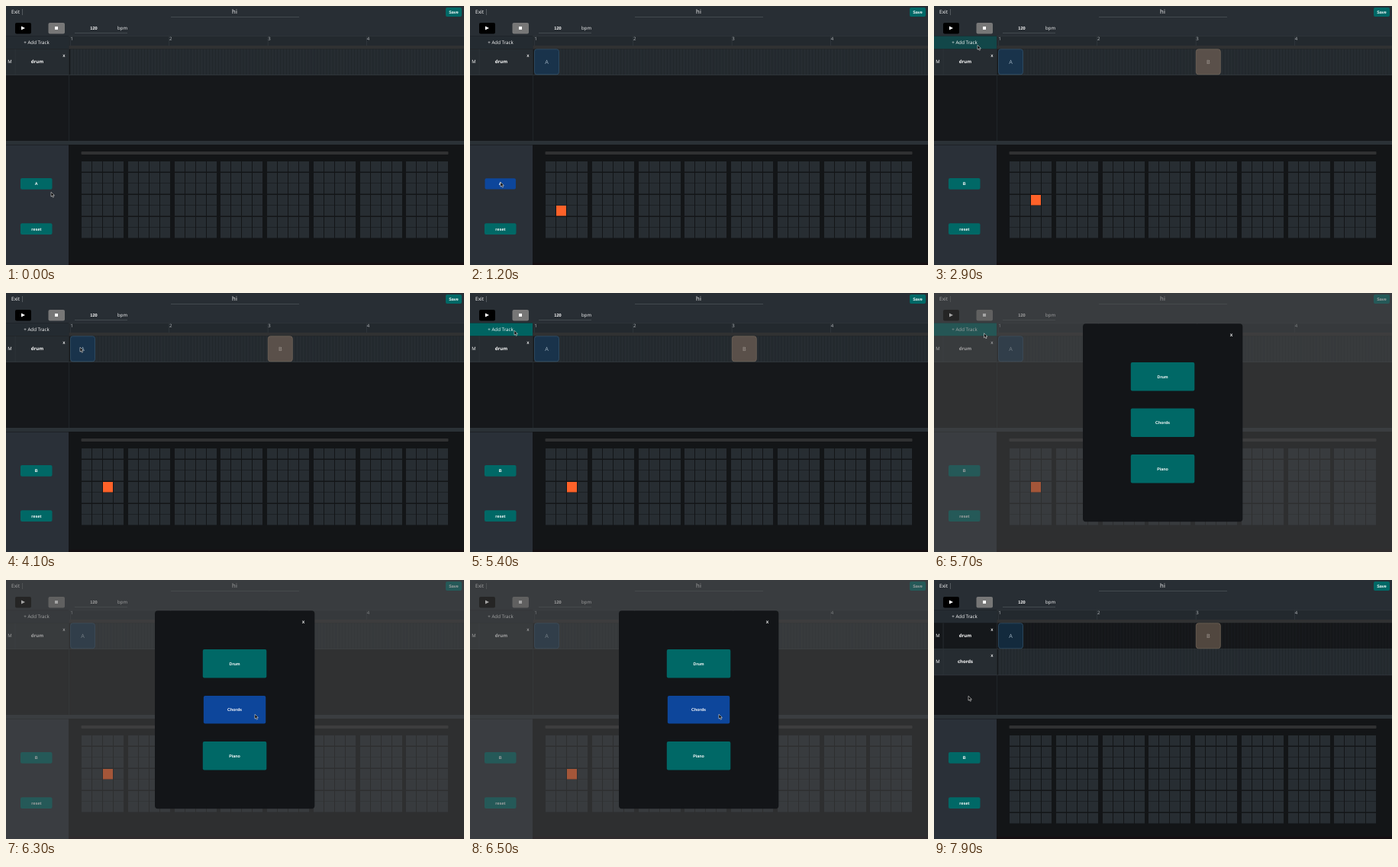
Write an HTML page with a canvas that moves like this. It is 600 px wide and 340 px high and loops after 8000 ms.

```html
<!DOCTYPE html>
<html lang="en">
<head>
<meta charset="utf-8">
<title>Step sequencer</title>
<style>
html, body { margin: 0; width: 100%; height: 100%; overflow: hidden; background: #131517; }
canvas { display: block; width: 600px; height: 340px; }
</style>
</head>
<body>
<canvas id="stage"></canvas>
<script>
const LOOP = 8000, STEP = 100;
const SANS = '"Open Sans", "Noto Sans", sans-serif';
const UI = '"Liberation Sans", Arial, sans-serif';
const TEAL = [0, 104, 102], BLUE = [13, 70, 155], PANEL = [36, 43, 49];
const LEFT = 84.5, BAR = 129.4, ROW = 34.2;

const canvas = document.getElementById('stage');
const ctx = canvas.getContext('2d');
const ratio = window.devicePixelRatio || 1;
canvas.width = 600 * ratio;
canvas.height = 340 * ratio;
ctx.scale(ratio, ratio);
ctx.textRendering = 'geometricPrecision';

// Places where the pointer rests; it eases from one to the next.
const STOPS = [
  { from: 0, to: 0, x: 59, y: 244 },
  { from: 450, to: 600, x: 120, y: 274 },
  { from: 1050, to: 1600, x: 40, y: 231 },
  { from: 2150, to: 2500, x: 134, y: 254 },
  { from: 2850, to: 3500, x: 57, y: 51 },
  { from: 4000, to: 4200, x: 97, y: 71 },
  { from: 4700, to: 4750, x: 56, y: 184 },
  { from: 5200, to: 5650, x: 58, y: 49 },
  { from: 6150, to: 6600, x: 326, y: 176 },
  { from: 7150, to: 7800, x: 45, y: 114 },
  { from: 7850, to: LOOP, x: 45, y: 152 }
];
// Moments at which clicks take effect
const CLICK = { pad: 500, pattern: 1400, secondPad: 2300, open: 5400, choose: 6600 };

const clamp = v => Math.max(0, Math.min(1, v));
const ramp = (t, a, b) => clamp((t - a) / (b - a));
const lerp = (a, b, k) => a + (b - a) * k;
const mix = (a, b, k) => `rgb(${a.map((v, i) => Math.round(lerp(v, b[i], k)))})`;

function pointerAt(t) {
  const i = Math.max(1, STOPS.findIndex(stop => stop.to >= t));
  const a = STOPS[i - 1], b = STOPS[i];
  const k = ramp(t, a.to, b.from), ease = k * k * (3 - 2 * k);
  return { x: lerp(a.x, b.x, ease), y: lerp(a.y, b.y, ease) };
}

// Share of the last 200 ms that the pointer spent inside a box
function hover(t, x, y, w, h) {
  let inside = 0;
  for (let ago = 0; ago < 200; ago += 50) {
    const p = pointerAt(Math.max(0, t - ago));
    if (p.x >= x && p.x <= x + w && p.y >= y && p.y <= y + h) inside++;
  }
  return inside / 4;
}

function rect(x, y, w, h, fill) {
  ctx.fillStyle = fill;
  ctx.fillRect(x, y, w, h);
}

function round(x, y, w, h, r, fill, stroke) {
  ctx.beginPath();
  ctx.roundRect(x, y, w, h, r);
  ctx.fillStyle = fill;
  ctx.fill();
  if (stroke) {
    ctx.strokeStyle = stroke;
    ctx.lineWidth = 0.7;
    ctx.stroke();
  }
}

function text(str, x, y, size, { font = SANS, weight = 400, color = '#fff', align = 'center' } = {}) {
  ctx.font = `${weight} ${size}px ${font}`;
  ctx.textAlign = align;
  ctx.fillStyle = color;
  ctx.fillText(str, x, y);
}

// Buttons turn blue and shrink slightly under the pointer.
function button(label, x, y, w, h, t = 0) {
  const hot = hover(t, x, y, w, h), inset = 0.0125 * hot;
  round(x + w * inset, y + h * inset, w * (1 - 2 * inset), h * (1 - 2 * inset), 2, mix(TEAL, BLUE, hot));
  text(label, x + w / 2, y + h / 2 + 2, 5.4, { font: UI, weight: 700 });
}

function drawToolbar() {
  rect(0, 0, 600, 39.5, '#282e34');
  text('Exit', 7, 10, 6.6, { align: 'left' });
  rect(21, 4, 0.6, 8, '#70767b');
  text('hi', 299.5, 10, 7.8);
  rect(216, 14, 168, 0.7, '#50565b');
  button('Save', 576, 2, 21, 12);
  round(12, 22, 21, 14.5, 2, '#000');
  ctx.beginPath();
  ctx.moveTo(20, 26.5);
  ctx.lineTo(25, 29);
  ctx.lineTo(20, 31.5);
  ctx.fillStyle = '#fff';
  ctx.fill();
  round(55.5, 22, 21.5, 14.5, 2, '#777');
  rect(64, 27, 4, 4, '#fff');
  text('120', 115, 31, 5.7, { font: UI, weight: 700 });
  rect(90, 35, 69, 0.7, '#50565b');
  text('bpm', 152.5, 30.5, 6);
}

function drawRuler(t) {
  rect(82, 39.5, 518, 13, '#23292e');
  rect(82, 39, 518, 0.7, '#343a40');
  rect(82, 52, 518, 4.5, '#303132');
  for (let i = 0; i < 4; i++) {
    const x = LEFT + i * BAR;
    rect(x - 0.5, 40, 0.7, 12, '#343a3f');
    text(i + 1, x, 44.5, 6, { align: 'left', color: '#b9bdc0' });
  }
  rect(0, 39.5, 82, 17, mix(PANEL, [0, 99, 97], hover(t, 0, 39.5, 82, 17)));
  text('+ Add Track', 40, 50, 6.2);
}

function drawTrack(name, index, active) {
  const y = 56.5 + index * ROW;
  rect(0, y, 82, ROW, active ? '#262c31' : '#15181b');
  rect(84, y, 516, ROW, active ? '#262c31' : '#17191c');
  for (let x = LEFT; x < 600; x += BAR / 32) {
    rect(x - 0.3, y, 0.6, ROW, active ? '#1f2529' : '#121416');
  }
  rect(0, y + ROW - 0.4, 600, 0.7, '#343b40');
  rect(11.7, y, 0.7, ROW, '#30363b');
  text('M', 5, y + 18.5, 6);
  text(name, 41, y + 18.5, 6, { weight: 700 });
  text('x', 76, y + 10.5, 6, { weight: 600 });
}

function drawClip(label, beat, fill, border, color) {
  const x = LEFT + beat * BAR / 4;
  round(x, 56.8, 32, 33, 3, fill, border);
  text(label, x + 16, 75.5, 7.2, { color });
}

function drawPads(rows, lit) {
  round(98.5, 191, 481, 4, 1, '#303132');
  for (let col = 0; col < 32; col++) {
    const x = Math.round(99 + Math.floor(col / 4) * 60.75) + (col % 4) * 14;
    for (let row = 0; row < rows; row++) {
      const on = lit && lit.col === col && lit.row === row;
      rect(x, Math.floor(204.5 + row * 14.5), 13, 13.5, on ? '#ff6229' : '#272d32');
    }
  }
}

function drawModal(t, alpha) {
  ctx.globalAlpha = alpha;
  round(195, 40.3, 209.3, 260, 4, '#131518');
  text('x', 389.5, 57, 6.5, { weight: 600 });
  ['Drum', 'Chords', 'Piano'].forEach((label, i) => button(label, 257.8, 91 + i * 60.5, 83.5, 37.5, t));
  ctx.globalAlpha = 1;
}

function drawPointer(t) {
  const p = pointerAt(t);
  ctx.save();
  ctx.translate(p.x, p.y);
  ctx.fillStyle = '#000';
  ctx.strokeStyle = '#e8e8e8';
  ctx.lineWidth = 0.6;
  const arrow = new Path2D('M0 .3V6.2L1.4 5 2.4 7.2 3.5 6.7 2.5 4.6H4.4Z');
  ctx.fill(arrow);
  ctx.stroke(arrow);
  ctx.restore();
}

function litPad(t) {
  if (t >= CLICK.choose + STEP) return null;
  if (t >= CLICK.secondPad) return { col: 2, row: 3 };
  return t >= CLICK.pad && t < CLICK.pattern ? { col: 1, row: 4 } : null;
}

function draw(t) {
  const added = t >= CLICK.choose + STEP;

  rect(0, 0, 600, 340, '#131517');
  rect(0, 56, 600, 122, '#16181b');
  drawToolbar();
  drawRuler(t);
  drawTrack('drum', 0, !added);
  if (added) drawTrack('chords', 1, true);
  rect(82, 39.5, 0.7, 138, '#262c30');
  if (t >= CLICK.pad) drawClip('A', 0, added ? '#132a3d' : '#19334b', '#355672', '#a3b6c5');
  if (t >= CLICK.secondPad) drawClip('B', 8, added ? '#51473f' : '#5a504a', '#776a5e', '#aaa29b');

  rect(0, 177.5, 600, 4.5, '#2a3136');
  rect(0, 177.5, 600, 0.7, '#363e43');
  rect(82, 337, 518, 3, '#160f12');
  rect(0, 182.5, 82, 157.5, '#2a3038');
  drawPads(added ? 8 : 7, litPad(t));
  button(t >= CLICK.pattern ? 'B' : 'A', 19, 226, 41.5, 14.7, t);
  button('reset', 19, 285.2, 41.5, 14.7, t);

  const closing = ramp(t, CLICK.choose, CLICK.choose + 200);
  const veil = ramp(t, CLICK.open, CLICK.open + 100) - closing;
  if (veil > 0) rect(0, 0, 600, 340, `rgba(75,75,75,${veil / 2})`);
  const modal = ramp(t, CLICK.open + 100, CLICK.open + 300) - closing;
  if (modal > 0) drawModal(t, modal);
  drawPointer(t);
}

const start = performance.now();
function tick() {
  const elapsed = (performance.now() - start) % LOOP;
  draw(Math.floor(elapsed / STEP) * STEP);
  requestAnimationFrame(tick);
}
tick();
</script>
</body>
</html>
```
